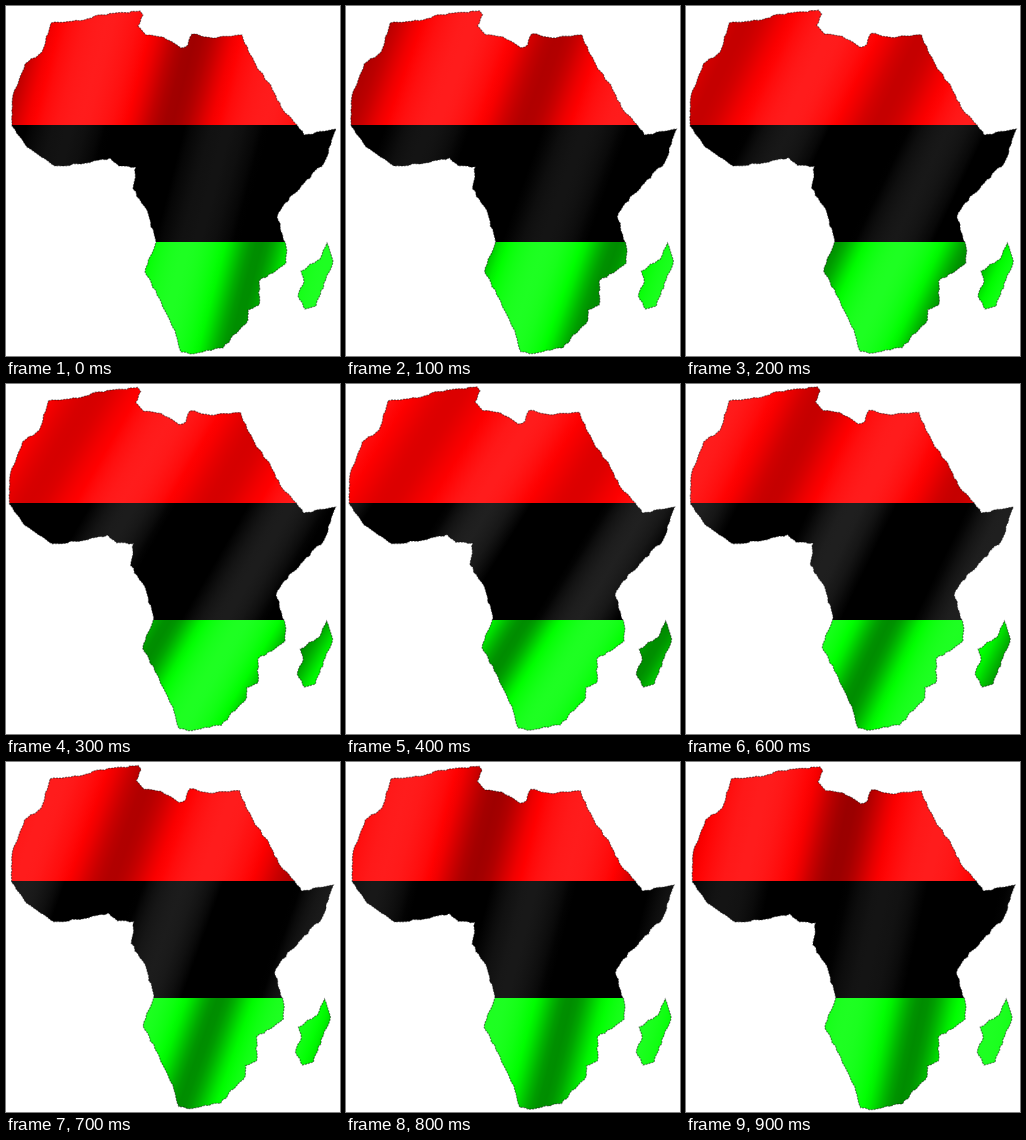
These frames come from a looping animation (334 by 350 pixels, 1000 ms). An HTML page with a canvas:

```html
<!DOCTYPE html>
<html lang="en">
<head>
<meta charset="utf-8">
<title>Waving flag map</title>
<style>
html, body { margin: 0; width: 100%; height: 100%; overflow: hidden; background: #fff; }
canvas { display: block; }
</style>
</head>
<body>
<canvas id="stage" width="334" height="350"></canvas>
<script>
const ctx = document.getElementById('stage').getContext('2d');
const LOOP = 1000, STEP = 100;

// Key points of each coast; the rest is seeded roughness.
const mainland = [
  45,17, 78,14, 92,9, 134,5, 137,9, 132,20, 140,29, 157,31, 175,42, 182,39,
  186,28, 210,32, 236,29, 250,59, 262,76, 277,104, 291,119, 298,129, 330,123,
  318,157, 279,197, 271,211, 280,240, 280,257, 253,275, 253,299, 242,304,
  242,314, 217,342, 184,348, 175,346, 170,329, 151,289, 139,266, 150,236,
  141,204, 127,183, 130,161, 113,160, 104,152, 75,158, 49,160, 21,141,
  6,120, 7,89, 19,58, 36,46
];
const island = [
  321,237, 327,255, 310,300, 299,303, 292,290, 298,276, 295,265, 314,253
];

let seed = 7;
const rand = () => (seed = (seed * 16807) % 2147483647) / 2147483647 - 0.5;
const cyc = v => Math.cos(2 * Math.PI * v);

function coast(list) {
  const pts = [];
  for (let i = 0; i < list.length; i += 2) {
    const x = list[i], y = list[i + 1];
    const dx = list[(i + 2) % list.length] - x;
    const dy = list[(i + 3) % list.length] - y;
    const n = Math.max(1, Math.round(Math.hypot(dx, dy) / 4));
    for (let k = 0; k < n; k++) {
      const j = k ? 1.8 : 0;
      pts.push([x + dx * k / n + rand() * j, y + dy * k / n + rand() * j]);
    }
  }
  return pts;
}
const shapes = [coast(mainland), coast(island)];

function sway([x, y], t) {
  const p = 0.87 + 0.26 * x / 330;
  const lift = Math.max(0, 1 - Math.abs(x - 150) / 110);
  return [x + 1.6 * (cyc(t - p) - cyc(p)), y + 1.4 * lift * (cyc(t) - 1)];
}

function outline(t) {
  const path = new Path2D();
  for (const pts of shapes) {
    pts.forEach((pt, i) => path[i ? 'lineTo' : 'moveTo'](...sway(pt, t)));
    path.closePath();
  }
  return path;
}

// wave: fold spacing; dark: x of a shadow at height mid when t = 0
const stripes = [
  { y: 0, h: 119, mid: 80, wave: 184, dark: 175, color: (dark, lit, t) => [
    255 * (1 - dark * (0.27 + 0.13 * cyc(t - 0.9))), 28 * lit, 28 * lit
  ] },
  { y: 119, h: 117, mid: 175, wave: 158, dark: 126, color: (dark, lit, t) =>
    Array(3).fill(lit * (26 - 7 * cyc(t))) },
  { y: 236, h: 114, mid: 270, wave: 145, dark: 245, color: (dark, lit) => [
    30 * lit, 255 * (1 - 0.45 * dark), 34 * lit
  ] }
];

// Folds travel one wavelength to the right per loop while their slant rocks.
function folds({ mid, wave, dark, color }, t) {
  const slant = 0.42 + 0.2 * cyc(t - 0.4);
  const unit = wave / (1 + slant * slant);
  const at = k => [k * unit, mid + k * unit * slant];
  const grad = ctx.createLinearGradient(...at(-1), ...at(3));
  const n = 96;
  for (let i = 0; i <= n; i++) {
    const c = cyc(i / n * 4 - dark / wave - t);
    const shade = Math.max(0, c) ** 1.4, lit = Math.max(0, -c) ** 0.8;
    grad.addColorStop(i / n, `rgb(${color(shade, lit, t).map(Math.round)})`);
  }
  return grad;
}

function draw(t) {
  const path = outline(t);
  ctx.fillStyle = '#fff';
  ctx.fillRect(0, 0, 334, 350);
  ctx.save();
  ctx.clip(path);
  for (const s of stripes) {
    ctx.fillStyle = folds(s, t);
    ctx.fillRect(0, s.y, 334, s.h);
  }
  ctx.restore();
  ctx.strokeStyle = 'rgba(0,0,0,0.45)';
  ctx.lineWidth = 1.2;
  ctx.setLineDash([2, 1]);
  ctx.stroke(path);
}

const start = performance.now();
let last = -1;
function tick() {
  const ms = Math.max(0, performance.now() - start) % LOOP;
  const step = Math.floor(ms / STEP);
  if (step !== last) draw((last = step) * STEP / LOOP);
  requestAnimationFrame(tick);
}
tick();
</script>
</body>
</html>
```
